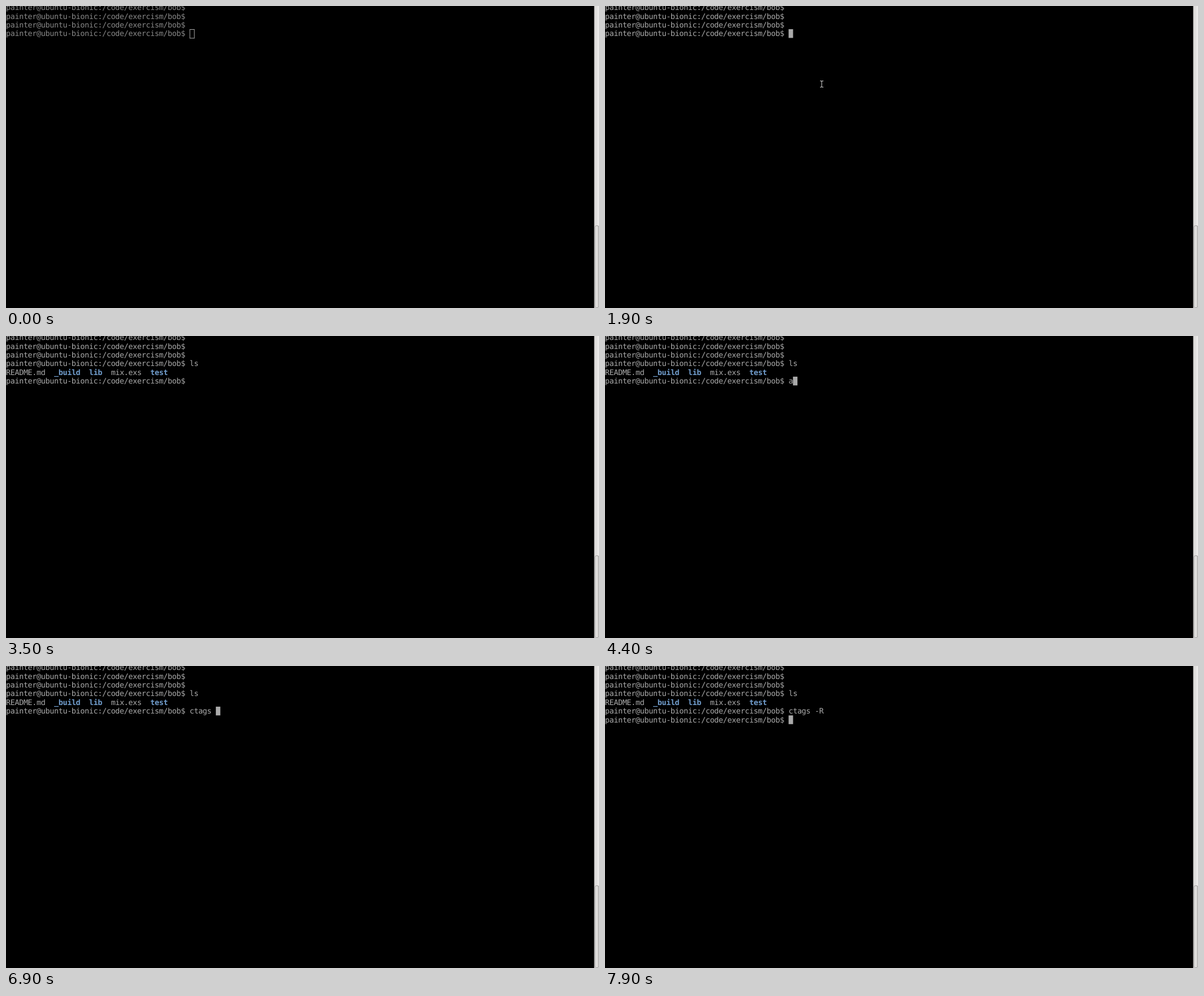
Recreate the animation shown at these times as an HTML page. Size 1048x534 px, loop 8 s.

```html
<!DOCTYPE html>
<html lang="en">
<head>
<meta charset="utf-8">
<title>Terminal session</title>
<style>
  html, body { margin: 0; width: 100%; height: 100%; overflow: hidden; background: #000; }
  svg { display: block; width: 100%; height: 100%; }
  text {
    font: 13.4px "DejaVu Sans Mono", monospace;
    letter-spacing: -0.337px;
    text-rendering: geometricPrecision;
    white-space: pre;
  }
  .dir { fill: #729fcf; font-weight: bold; }
</style>
</head>
<body>
<svg viewBox="0 0 1048 534">
  <defs>
    <linearGradient id="trough">
      <stop offset="0" stop-color="#d6d4d2"/>
      <stop offset="1" stop-color="#eeedec"/>
    </linearGradient>
    <linearGradient id="thumb">
      <stop offset="0" stop-color="#e9e8e7"/>
      <stop offset="1" stop-color="#cfcdcb"/>
    </linearGradient>
  </defs>
  <rect width="1048" height="534"/>
  <g id="screen"></g>
  <rect id="cursor" stroke="#aaa"/>
  <path id="pointer" d="M-3 -5.5H-1L0 -4.5L1 -5.5H3M0 -4.5V4.5M-3 5.5H-1L0 4.5L1 5.5H3"
        fill="none" stroke="#ccc" stroke-width="1.1"/>
  <rect x="1039.5" width="8.5" height="534" fill="url(#trough)"/>
  <rect x="1041" y="388.5" width="6.7" height="145" rx="2.5" fill="url(#thumb)" stroke="#999"/>
</svg>
<script>
const LOOP = 8000, CELL = 7.73, ROW = 15.45, TOP = -5.35, BASELINE = 12.4;
const PROMPT = 'painter@ubuntu-bionic:/code/exercism/bob$ ';
const LISTING = 'README.md  <tspan class="dir">_build</tspan>  <tspan class="dir">lib</tspan>' +
  '  mix.exs  <tspan class="dir">test</tspan>';
const FOCUS = 1900, LISTED = 2800, TAGGED = 7900;

// [start time, value] steps; the latest one reached applies
const TYPING = [
  [0, ''], [4400, 'a'], [5000, 'ca'], [5500, 'ct'], [5600, 'cta'], [6300, 'ctag'],
  [6500, 'ctags'], [6900, 'ctags '], [7200, 'ctags -'], [7400, 'ctags -R'], [7600, 'ctags -R ']
];
const POINTER = [
  [0, null], [1300, [344.5, 90]], [1400, [371, 122]], [1500, [383, 138]], [LISTED, null]
];
const BLINK_OFF = [3500, 4100];

const [screen, cursor, pointer] =
  ['screen', 'cursor', 'pointer'].map(id => document.getElementById(id));

const stepAt = (steps, t) => steps.findLast(([start]) => t >= start)[1];

function setAttributes(element, attributes) {
  for (const name in attributes) element.setAttribute(name, attributes[name]);
}

function linesAt(t) {
  const lines = [PROMPT, PROMPT, PROMPT];
  if (t < LISTED) return [...lines, PROMPT];
  lines.push(PROMPT + 'ls', LISTING, PROMPT + stepAt(TYPING, t));
  if (t >= TAGGED) lines.push(PROMPT);
  return lines;
}

let shown = '';

function draw(t) {
  const lines = linesAt(t);
  const focused = t >= FOCUS;
  const markup = lines.map((line, i) =>
    `<text y="${TOP + i * ROW + BASELINE}">${line}</text>`).join('');
  if (markup !== shown) screen.innerHTML = shown = markup;
  screen.setAttribute('fill', focused ? '#aaa' : '#888');

  const inset = focused ? 0 : 0.5;
  setAttributes(cursor, {
    x: lines.at(-1).length * CELL - 0.2 + inset,
    y: TOP + (lines.length - 1) * ROW + inset,
    width: CELL + 0.2,
    height: ROW,
    fill: focused ? '#aaa' : 'none',
    'stroke-width': focused ? 0 : 1,
    visibility: t >= BLINK_OFF[0] && t < BLINK_OFF[1] ? 'hidden' : 'visible'
  });

  const spot = stepAt(POINTER, t);
  pointer.setAttribute('visibility', spot ? 'visible' : 'hidden');
  if (spot) pointer.setAttribute('transform', `translate(${spot})`);
}

const start = performance.now();
function tick() {
  draw((performance.now() - start) % LOOP);
  requestAnimationFrame(tick);
}
tick();
</script>
</body>
</html>
```
